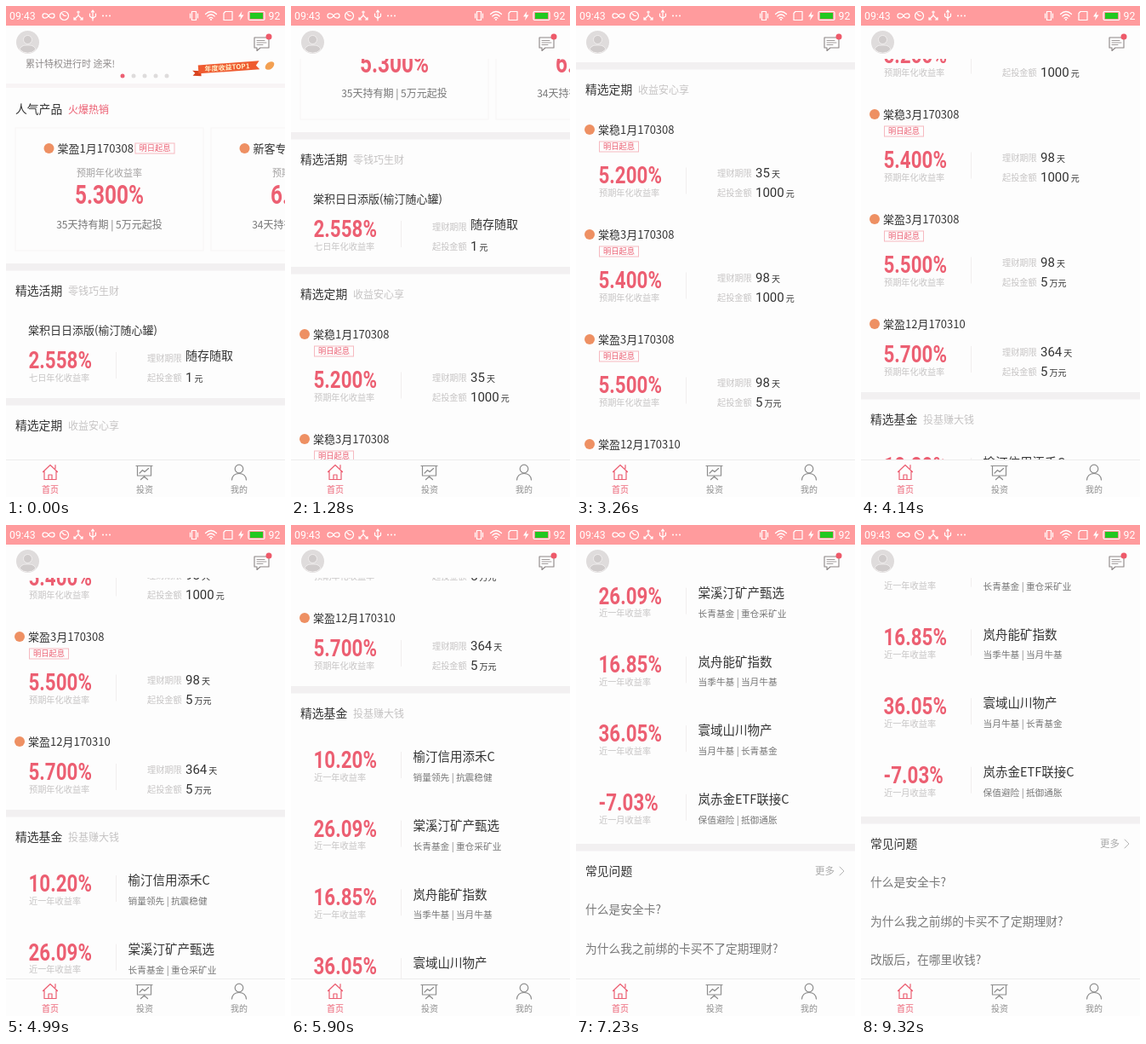
Recreate the animation shown at these times as an HTML page. Size 328x576 px, loop 9.6 s.

```html
<!DOCTYPE html>
<html lang="zh-CN">
<head>
<meta charset="utf-8">
<style>
html, body { margin: 0; width: 100%; height: 100%; overflow: hidden; background: #fdfdfd; }
svg { display: block; font-family: "Noto Sans CJK SC", "Noto Sans CJK", "Noto Sans", sans-serif; }
.num { font-family: Roboto, "Liberation Sans", sans-serif; }
.big { font-family: Roboto, "Liberation Sans", sans-serif; font-weight: 700; fill: #ec5f72; }
.line { fill: none; stroke-linecap: round; stroke-linejoin: round; }
</style>
</head>
<body>
<svg width="328" height="576" viewBox="0 0 328 576">
  <g id="page"></g>

  <g id="header">
    <rect y="23" width="328" height="39" fill="#fdfdfd"/>
    <circle cx="25.5" cy="42.5" r="13.5" fill="#dfdcdc"/>
    <circle cx="25.5" cy="39.5" r="5" fill="#d0cccc" stroke="#f1eeee"/>
    <path d="M16 51c2-5 6-5 9.500-5s7.500 0 9.500 5a13 13 0 0 1-19 0z" fill="#d0cccc" stroke="#f1eeee"/>
    <g class="line" stroke="#8b8585" stroke-width="1.100">
      <path d="M292 37h17v12h-10l-4 3.500v-3.500h-3z"/>
      <path d="M295 40.500h9M295 43h11M295 45.500h7" stroke-width=".8"/>
    </g>
    <circle cx="309" cy="36" r="3.500" fill="#ee5a6a"/>
  </g>

  <g id="status">
    <rect width="328" height="23" fill="#ff9b9d"/>
    <g class="line" stroke="#fff" stroke-width="1.200">
      <path d="M50 11.500c-2-3.500-7-3.500-7 0s5 3.500 7 0s7-3.500 7 0s-5 3.500-7 0z"/>
      <circle cx="68.500" cy="11.500" r="5"/><path d="M66 9l2.500 2.500h2"/>
      <path d="M85 6v5l-5 5M85 11l5 5M83.500 7h3M80 13.500v2.500h2.500M90 13.500v2.500h-2.500"/>
      <path d="M102 5v12M98.500 9v3l3.500 2.500l3.500-2.500v-3M100.500 7l1.500-2l1.500 2"/>
      <path d="M218.500 6.500h5v10h-5zM216.500 9v5M225.500 9v5"/>
      <path d="M234.500 9.500q6.500-6 13 0M236.800 12q4.200-4 8.400 0M239 14.300q2-2 4 0"/>
      <path d="M258 6.500h8v10h-10v-8z"/>
      <rect x="285" y="6.500" width="19" height="10" rx="1.500"/>
    </g>
    <path d="M277.500 6l-4.500 6.500h3l-1 4.500l4.500-6.500h-3z" fill="#fff"/>
    <rect x="287" y="8" width="15" height="7" fill="#21c820"/>
    <g fill="#fff"><circle cx="241" cy="16" r="1"/><circle cx="114" cy="11.500" r="1"/><circle cx="118" cy="11.500" r="1"/><circle cx="122" cy="11.500" r="1"/></g>
  </g>

  <g id="nav">
    <rect y="532" width="328" height="44" fill="#fdfdfd"/>
    <path d="M0 532.500h328" stroke="#ededed"/>
    <g class="line" stroke-width="1.200">
      <path d="M43.500 546.500l8.500-8l8.500 8M45 545.500v10h14v-10M58 538.500v4M50 555v-5h4v5" stroke="#ec5f72"/>
      <g stroke="#8d8d8d">
        <path d="M153 539.500h19M154.500 539.500v11.500h16v-11.500M162.500 551v2M162.500 552l-4 3.500M162.500 552l4 3.500M157 548l3.500-3.500l2.500 2l4.500-4"/>
        <circle cx="274" cy="543" r="4.800"/><path d="M265.500 556c.5-5 4-7.500 8.500-7.500s8 2.500 8.500 7.500"/>
      </g>
    </g>
  </g>
</svg>
<script>
const PINK = '#ec5f72', DARK = '#333', MID = '#777', PALE = '#c6c4c4';
const NS = 'http://www.w3.org/2000/svg';
const page = document.getElementById('page');

function add(parent, tag, attrs, text) {
  const el = document.createElementNS(NS, tag);
  for (const k in attrs) el.setAttribute(k, attrs[k]);
  if (text) el.textContent = text;
  parent.append(el);
  return el;
}

// Text placed by the middle of its line
const label = (x, y, size, fill, text, extra = {}, parent = page) =>
  add(parent, 'text', { x, y: y + size * 0.37, 'font-size': size, fill, ...extra }, text);

// Narrow numerals share one ratio
const big = (x, y, size, text, anchor = 'start') =>
  add(page, 'text', { class: 'big', 'font-size': size, 'text-anchor': anchor,
    transform: `translate(${x} ${y + size * 0.355}) scale(.8 1)` }, text);

const band = (y, h = 8.5) => add(page, 'rect', { y, width: 328, height: h, fill: '#f2f0f1' });
const badge = (x, y) => add(page, 'circle', { cx: x, cy: y, r: 6, fill: '#ee9063' });
const rule = (y, h) => add(page, 'path', { d: `M129.500 ${y}v${h}`, stroke: '#f1efef' });

function tag(x, y) {
  add(page, 'rect', { x: x + .5, y: y - 6, width: 46, height: 12, fill: 'none', stroke: '#f6b9c0' });
  label(x + 23.5, y, 9.3, PINK, '明日起息', { 'text-anchor': 'middle' });
}

function section(y, title, sub, color = PALE) {
  label(11, y, 13.8, DARK, title);
  if (sub) label(73, y + 1, 12, color, sub);
}

function card(mid, name, rate, terms, tagged) {
  const left = mid - 110.5;
  add(page, 'rect', { x: left, y: 143, width: 221, height: 144, fill: 'none', stroke: '#f7f5f5' });
  badge(mid - 71, 167);
  label(mid - 61, 167, 13, DARK, name);
  if (tagged) tag(mid + 30, 167);
  const center = { 'text-anchor': 'middle' };
  label(mid, 196, 11, '#a3a1a1', '预期年化收益率', center);
  big(mid, 221, 30.5, rate, 'middle');
  label(mid, 257, 12, MID, terms, center);
}

function value(y, num, unit) {
  const t = label(211, y, 15, DARK, num, { class: 'num' });
  const u = add(t, 'tspan', { dx: 2, 'font-size': 10 }, unit);
  u.style.fontFamily = '"Noto Sans CJK SC", "Noto Sans CJK", sans-serif';
}

function product(y, name, rate, note, term, amount, tagged) {
  if (tagged !== null) badge(16, y);
  label(26, y, 13, DARK, name);
  if (tagged) { tag(27, y + 20); y += 18.5; }
  big(26.5, y + 35, 28, rate);
  label(27, y + 56, 10.2, PALE, note);
  rule(y + 26, 31);
  label(166, y + 33, 10.2, PALE, '理财期限');
  label(166, y + 56, 10.2, PALE, '起投金额');
  if (term) value(y + 32, term, '天');
  else label(211, y + 30, 14, DARK, '随存随取');
  value(y + 55, ...amount);
}

function fund(y, rate, span, name, notes) {
  big(26.5, y, 28, rate);
  label(27, y + 21, 10.2, PALE, `近一${span}收益率`);
  rule(y - 9, 31);
  label(143.5, y - 3, 14.5, DARK, name);
  label(143.5, y + 21, 10.7, MID, notes);
}

// Banner
label(23, 68, 11, '#8f8b8b', '累计特权进行时  途来!');
const ribbon = add(page, 'g', { transform: 'rotate(-4 260 72)' });
add(ribbon, 'path', { d: 'M219 73l10 1v6l-10-1l3-3z', fill: '#d8431f' });
add(ribbon, 'path', { d: 'M226 67h72l-4 5l4 5h-72z', fill: '#ef5b30' });
label(260, 72, 8, '#fff0c8', '年度收益TOP1', { 'text-anchor': 'middle', 'font-weight': 700 }, ribbon);
add(page, 'ellipse', { cx: 310, cy: 70, rx: 6, ry: 4, fill: '#f3a052', transform: 'rotate(-38 310 70)' });
for (let i = 0; i < 5; i++)
  add(page, 'circle', { cx: 137 + 13 * i, cy: 82, r: 2.5, fill: i ? '#dedcdc' : PINK });
band(91, 5).setAttribute('fill', '#f8f4f5');

section(121, '人气产品', '火爆热销', PINK);
card(121.5, '棠盈1月170308', '5.300%', '35天持有期 | 5万元起投', true);
card(351.5, '新客专享', '6.800%', '34天持有期 | 1万元起投');

band(302);
section(334, '精选活期', '零钱巧生财');
product(380, '棠积日日添版(榆汀随心罐)', '2.558%', '七日年化收益率', '', ['1', '元'], null);

band(460);
section(492, '精选定期', '收益安心享');
const expected = '预期年化收益率';
product(539, '棠稳1月170308', '5.200%', expected, '35', ['1000', '元'], true);
product(662, '棠稳3月170308', '5.400%', expected, '98', ['1000', '元'], true);
product(785, '棠盈3月170308', '5.500%', expected, '98', ['5', '万元'], true);
product(908, '棠盈12月170310', '5.700%', expected, '364', ['5', '万元'], false);

band(988);
section(1020, '精选基金', '投基赚大钱');
[
  ['10.20%', '年', '榆汀信用添禾C', '销量领先 | 抗震稳健'],
  ['26.09%', '年', '棠溪汀矿产甄选', '长青基金 | 重仓采矿业'],
  ['16.85%', '年', '岚舟能矿指数', '当季牛基 | 当月牛基'],
  ['36.05%', '年', '寰域山川物产', '当月牛基 | 长青基金'],
  ['-7.03%', '月', '岚赤金ETF联接C', '保值避险 | 抵御通胀']
].forEach((row, i) => fund(1074 + 80.7 * i, ...row));

band(1446);
section(1478, '常见问题');
label(281, 1478, 11.5, '#aaa', '更多');
add(page, 'path', { class: 'line', d: 'M310 1473l5 5l-5 5', stroke: '#b5b5b5' });
['什么是安全卡?', '为什么我之前绑的卡买不了定期理财?', '改版后，在哪里收钱?']
  .forEach((q, i) => label(11, 1523 + 45.5 * i, 13.75, MID, q));

// Fixed bars
const status = document.getElementById('status'), nav = document.getElementById('nav');
label(4, 11.5, 12.3, '#fff', '09:43', { class: 'num' }, status);
label(308.500, 11.5, 12.3, '#fff', '92', { class: 'num' }, status);
['首页', '投资', '我的'].forEach((name, i) =>
  label(52 + 111 * i, 567, 10, i ? '#8d8d8d' : PINK, name, { 'text-anchor': 'middle' }, nav));

const LOOP = 9600;
const groups = [150, 1280, 2410, 3570, 4720, 5780, 6840, 7920, 9050];
function tickAt(t) {
  if (t < groups[0]) return 0;
  let i = 0;
  while (i < 7 && t >= groups[i + 1]) i++;
  const part = (t - groups[i]) / (groups[i + 1] - groups[i]) * 8;
  return 1 + 8 * i + Math.min(7, Math.floor(part + .15));
}

// tick, scroll, speed
const knots = [[0, 0, 17], [9, 154, 15], [17, 265, 17], [29, 535, 21], [42, 799, 23], [52, 1072, 18], [56, 1104, 0]];
function scrollAt(tick) {
  const n = knots.findIndex(k => k[0] > tick);
  if (n < 0) return 1104;
  const [a, y0, v0] = knots[n - 1], [b, y1, v1] = knots[n];
  const d = b - a, u = (tick - a) / d, w = 1 - u;
  return w * w * (1 + 2 * u) * y0 + u * u * (3 - 2 * u) * y1 + d * u * w * (w * v0 - u * v1);
}

const start = performance.now();
function draw() {
  const t = (performance.now() - start) % LOOP;
  page.setAttribute('transform', `translate(0 ${-Math.round(scrollAt(tickAt(t)))})`);
  requestAnimationFrame(draw);
}
draw();
</script>
</body>
</html>
```
